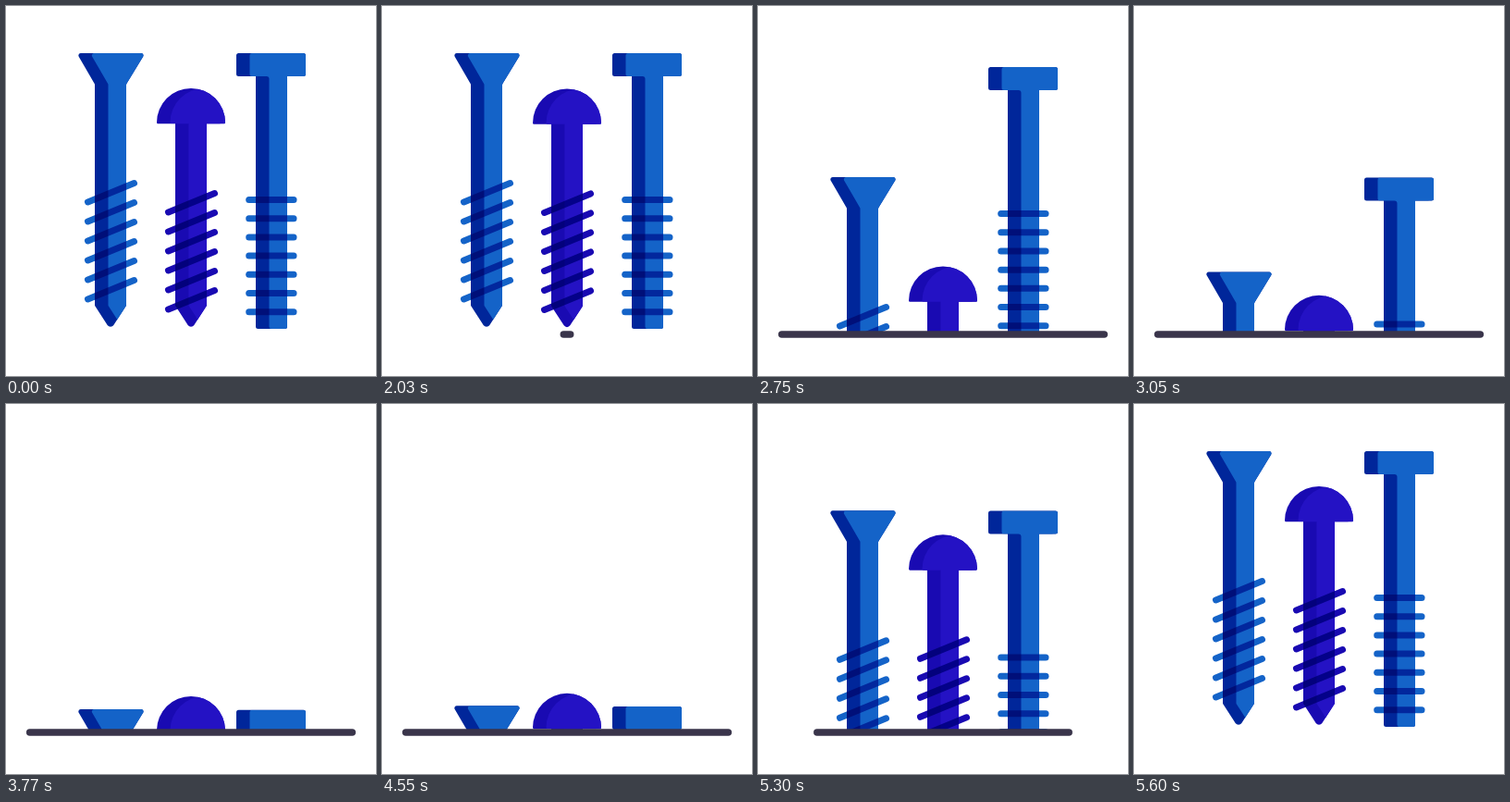
An HTML page with a canvas that plays this animation: 400 by 400 pixels, repeating every 5660 ms.

```html
<!DOCTYPE html>
<html lang="en">
<head>
<meta charset="utf-8">
<title>Screws</title>
<style>
  html, body { margin: 0; width: 100%; height: 100%; overflow: hidden; background: #fff; }
  canvas { display: block; width: 400px; height: 400px; }
</style>
</head>
<body>
<canvas id="stage" width="400" height="400"></canvas>
<script>
const ctx = document.getElementById('stage').getContext('2d');
const LOOP = 5660, STEP = 30, PHASE = 20;
const RETURN_AXIS = 7600; // going back is the way in, mirrored in time
const SHADE = 14.5, GROUND = 352;
const BLUE = '#1463c8', NAVY = '#00269a', VIOLET = '#2412c4', INDIGO = '#190ab2';

// Cubic Bezier easing (0.333, 0, 0.36, 1), solved by bisection
function ease(x) {
  if (x <= 0) return 0;
  if (x >= 1) return 1;
  let lo = 0, hi = 1;
  for (let i = 0; i < 24; i++) {
    const s = (lo + hi) / 2, r = 1 - s;
    if (r * r * s + 1.08 * r * s * s + s * s * s < x) lo = s; else hi = s;
  }
  return lo * lo * (3 - 2 * lo);
}

// Closed polygon with rounded corners; a point is [x, y, radius]
function rounded(points) {
  const path = new Path2D(), last = points[points.length - 1];
  path.moveTo((last[0] + points[0][0]) / 2, (last[1] + points[0][1]) / 2);
  points.forEach(([x, y, r = 2.5], i) => {
    const next = points[(i + 1) % points.length];
    path.arcTo(x, y, next[0], next[1], r);
  });
  path.closePath();
  return path;
}

function countersunk() {
  return rounded([[76.5, 51], [150.5, 51], [130, 84.5], [130, 324], [113, 350, 4], [96, 324], [96, 84.5]]);
}

function domed() {
  const path = rounded([[183, 120], [217, 120], [217, 324], [200, 350, 4], [183, 324]]);
  path.moveTo(163, 126);
  path.arc(200, 126, 37, Math.PI, 0);
  path.arcTo(237, 127.3, 235, 127.3, 1.3);
  path.lineTo(165, 127.3);
  path.arcTo(163, 127.3, 163, 126, 1.3);
  path.closePath();
  return path;
}

function flat(inner) {
  return rounded([[249, 51], [324, 51], [324, 76], [304, 76, 0], [304, 349], [270, 349], [270, 76, inner], [249, 76]]);
}

const screws = [
  { body: countersunk(), light: BLUE, dark: NAVY, thread: BLUE,
    x: 88.5, y: 212, width: 50, rise: 20.5, count: 6, gap: 21, start: 2300, depth: 279 },
  { body: domed(), light: VIOLET, dark: INDIGO, thread: INDIGO,
    x: 175.5, y: 223, width: 50, rise: 20.5, count: 6, gap: 21, start: 2000, depth: 227 },
  { body: flat(0), face: flat(3), light: BLUE, dark: NAVY, thread: BLUE,
    x: 262.7, y: 209.5, width: 48.3, rise: 0, count: 7, gap: 20.2, start: 2600, depth: 280 }
];

function drawScrew(screw, sink) {
  ctx.save();
  ctx.translate(0, sink);

  ctx.fillStyle = screw.dark;
  ctx.fill(screw.body);
  ctx.save();
  ctx.clip(screw.body);
  ctx.translate(SHADE, 0);
  ctx.fillStyle = screw.light;
  ctx.fill(screw.face || screw.body);
  ctx.restore();

  ctx.globalCompositeOperation = 'multiply';
  ctx.strokeStyle = screw.thread;
  ctx.lineWidth = 7;
  for (let i = 0; i < screw.count; i++) {
    const y = screw.y + i * screw.gap;
    ctx.beginPath();
    ctx.moveTo(screw.x, y);
    ctx.lineTo(screw.x + screw.width, y - screw.rise);
    ctx.stroke();
  }
  ctx.restore();
}

function drawGround(progress) {
  const half = 174.3 * progress;
  ctx.strokeStyle = '#3a354b';
  ctx.lineWidth = 7.5;
  ctx.beginPath();
  ctx.moveTo(200 - half, 355);
  ctx.lineTo(200 + half, 355);
  ctx.stroke();
}

function draw(time) {
  const t = Math.floor((time - PHASE) / STEP) * STEP + PHASE;
  const back = t > 4000;
  const mirrored = RETURN_AXIS - t;

  ctx.fillStyle = '#fff';
  ctx.fillRect(0, 0, 400, 400);
  ctx.lineCap = 'round';

  ctx.save();
  ctx.beginPath();
  ctx.rect(0, 0, 400, GROUND);
  ctx.clip();
  for (const screw of screws) {
    // All three rise together, but sink one after another
    const elapsed = back ? mirrored - 2000 : t - screw.start;
    drawScrew(screw, screw.depth * ease(elapsed / 1200));
  }
  ctx.restore();

  const lineTime = back ? mirrored : t;
  if (lineTime > 2000) drawGround(ease((lineTime - 1985) / 560));
}

const begin = performance.now();
function tick() {
  draw((performance.now() - begin) % LOOP);
  requestAnimationFrame(tick);
}
tick();
</script>
</body>
</html>
```
